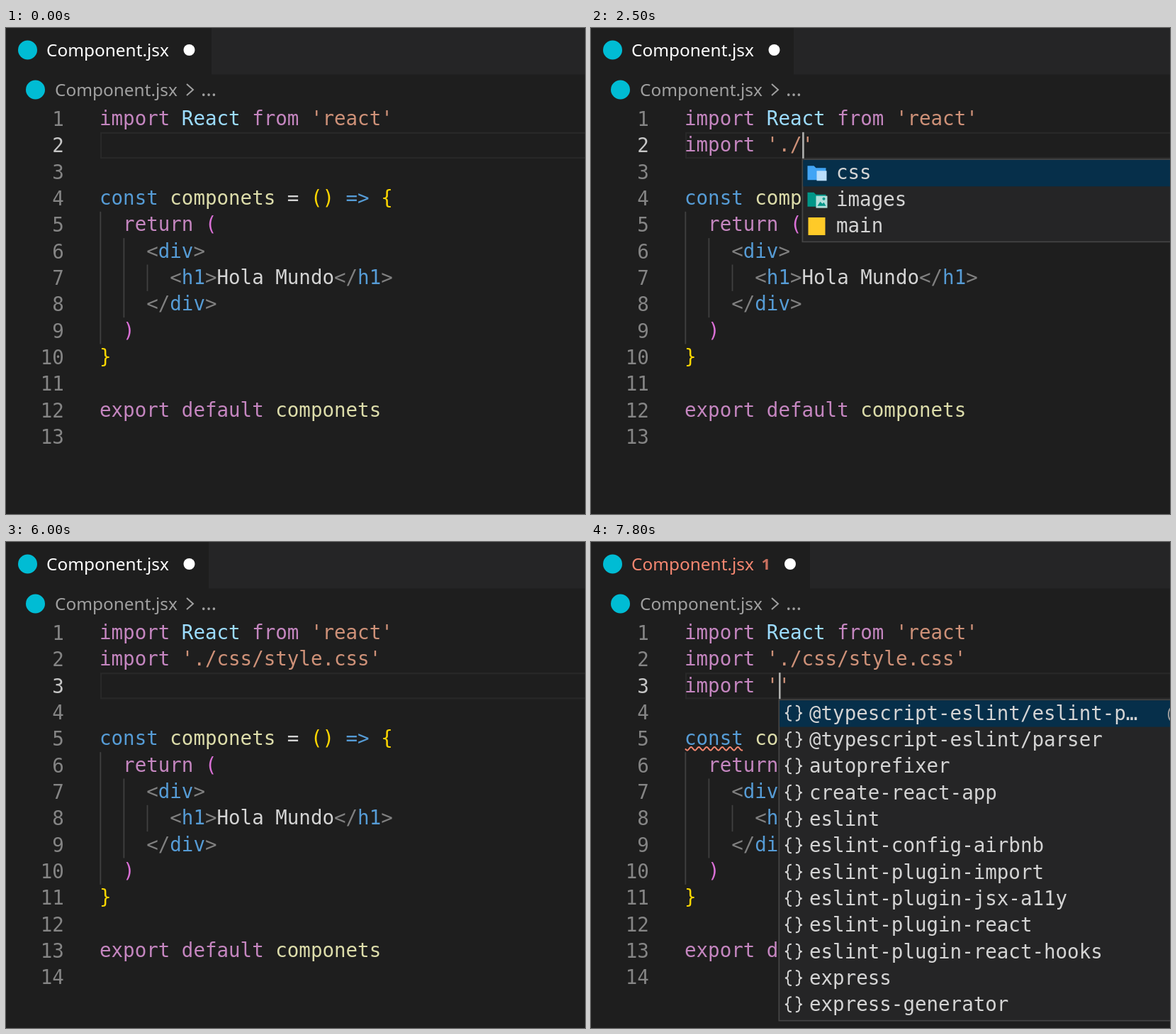
Recreate the animation shown at these times as an HTML page with a canvas. Size 817 by 685 pixels, loop 8 s.

```html
<!DOCTYPE html>
<html lang="es">
<head>
<meta charset="utf-8">
<title>Component.jsx</title>
<style>
html, body { margin: 0; width: 100%; height: 100%; overflow: hidden; background: #1e1e1e; }
canvas { display: block; }
</style>
</head>
<body>
<canvas id="stage" width="817" height="685"></canvas>
<script>
const ctx = document.getElementById('stage').getContext('2d');
const W = 817, H = 685, LOOP = 8000;
const LEFT = 132, ADV = 16.55, LINE = 37.33, TOP = 109.5;
const MONO = '27.5px "DejaVu Sans Mono", monospace';
const UI = '24.4px "Noto Sans", sans-serif';
const COLORS = {
  k: '#c586c0', v: '#9cdcfe', s: '#ce9178', b: '#569cd6', f: '#dcdcaa',
  d: '#d4d4d4', y: '#ffd700', p: '#da70d6', g: '#808080'
};

// Tokens: [class, text, class while the statement above is incomplete]
const tag = (open, name) => [['g', open, 'd'], ['b', name, 'v'], ['g', '>', 'd']];
const IMPORT_REACT = [['k', 'import '], ['v', 'React '], ['k', 'from '], ['s', "'react'"]];
const BODY = [
  [['b', 'const ', 'v'], ['f', 'componets '], ['d', '= '], ['y', '() '], ['b', '=> '], ['y', '{']],
  [['k', '  return ', 'v'], ['p', '(']],
  tag('    <', 'div'),
  [...tag('      <', 'h1'), ['d', 'Hola Mundo', 'v'], ...tag('</', 'h1')],
  tag('    </', 'div'),
  [['p', '  )']],
  [['y', '}']],
  [],
  [['k', 'export ', 'v'], ['k', 'default '], ['f', 'componets']]
];

// Suggestion lists: text offset, detail offset, rows of [icon, label, detail]
const WORDS = [
  ['keyword', 'import'], ['cube', 'importScripts'],
  ['snippet', 'import statement', 'Import external module'],
  ['variable', 'ImageBitmapRenderingContext']
];
const MENUS = {
  few: { text: 45.6, detail: 446, rows: WORDS },
  many: { text: 45.6, detail: 446, rows: [...WORDS,
    ['variable', 'Image'], ['variable', 'ImageBitmap'], ['variable', 'ImageData'],
    ['keyword', 'implements'], ['snippet', 'imp'], ['snippet', 'imd'],
    ['snippet', 'ime'], ['variable', 'HTMLImageElement']] },
  packages: { text: 43.6, detail: 549, rows: [
    '@typescript-eslint/eslint-p…', '@typescript-eslint/parser', 'autoprefixer',
    'create-react-app', 'eslint', 'eslint-config-airbnb', 'eslint-plugin-import',
    'eslint-plugin-jsx-a11y', 'eslint-plugin-react', 'eslint-plugin-react-hooks',
    'express', 'express-generator'
  ].map((name, i) => ['braces', name, i ? '' : '@typescript-eslint/eslint-plugin']) },
  files: { text: 48.5, rows: [['styles', 'css'], ['pictures', 'images'], ['script', 'main']] },
  sheet: { text: 48.8, rows: [['sheet', 'style.css']] }
};

// [start, typed text, menu, cursor hidden]
const STEPS = [
  [0, '', '', 1], [200, ''], [400, 'im'], [600, 'im', 'many'], [700, 'imp', 'few'],
  [800, 'impor', 'few'], [1000, 'import', 'few'], [1100, 'import '], [1600, 'import ', '', 1],
  [1800, "import '"], [1900, "import '", 'packages'], [2100, "import '."],
  [2400, "import './"], [2500, "import './", 'files'], [2900, "import './", 'files', 1],
  [3200, "import './css"], [3700, "import './css", '', 1], [3900, "import './css/"],
  [4000, "import './css/", 'sheet'], [4400, "import './css/style.css"],
  [4900, "import './css/style.css", '', 1], [5400, ''], [6000, '', '', 1], [6100, 'i'],
  [6200, 'im'], [6300, 'im', 'many'], [6400, 'imp', 'few'], [6500, 'impo', 'few'],
  [6600, 'impor', 'few'], [6800, 'import', 'few'], [6900, 'import ', 'few'],
  [7000, 'import '], [7400, 'import ', '', 1], [7700, "import '"],
  [7800, "import '", 'packages']
];
const NEW_LINE = 5400;

const within = (t, a, b) => t >= a && t < b;
const lineTop = n => TOP + (n - 1) * LINE;

function box(x, y, w, h, color) {
  ctx.fillStyle = color;
  ctx.fillRect(x, y, w, h);
}

function dot(x, y, r, color) {
  ctx.fillStyle = color;
  ctx.beginPath();
  ctx.arc(x, y, r, 0, Math.PI * 2);
  ctx.fill();
}

function poly(points, color, fill) {
  ctx.beginPath();
  points.forEach(([x, y]) => ctx.lineTo(x, y));
  if (fill) {
    ctx.fillStyle = color;
    ctx.fill();
  } else {
    ctx.strokeStyle = color;
    ctx.stroke();
  }
}

function label(text, x, y, color, font = UI) {
  ctx.font = font;
  ctx.fillStyle = color;
  ctx.fillText(text, x, y);
}

// Monospaced text on the character grid
function mono(text, x, y, color, bold) {
  [...text].forEach((ch, i) => {
    if (ch !== ' ') label(ch, x + i * ADV, y, color, (bold ? 'bold ' : '') + MONO);
  });
}

function codeLine(tokens, n, broken) {
  let col = 0;
  for (const [kind, text, alt] of tokens) {
    mono(text, LEFT + col * ADV, lineTop(n) + 27.4, COLORS[broken && alt || kind]);
    col += text.length;
  }
}

function importTokens(typed) {
  const word = typed.slice(0, 6);
  const rest = typed.slice(6);
  return [[word === 'import' ? 'k' : 'v', word],
    ['s', rest.includes("'") ? rest + "'" : rest]];
}

function folder(color) {
  poly([[0, -10], [9, -10], [12, -7], [26, -7], [26, 10], [0, 10]], color, true);
}

// Icons are drawn around the vertical centre of a row
const ICONS = {
  keyword() {
    ctx.strokeStyle = COLORS.d;
    ctx.strokeRect(1, -11, 13, 5);
    [[18, -9, 10], [0, -2, 15], [20, -2, 8], [0, 4, 23], [0, 9, 28]]
      .forEach(([x, y, w]) => box(x, y, w, 2, COLORS.d));
  },
  cube() {
    const c = '#b180d7';
    poly([[14, -13], [25, -7], [25, 6], [14, 12], [3, 6], [3, -7], [14, -13]], c);
    poly([[3, -7], [14, -1], [25, -7]], c);
    poly([[14, -1], [14, 12]], c);
  },
  snippet() {
    poly([[3, 9], [3, -12], [27, -12], [27, 9]], COLORS.d);
    for (let x = 2; x < 28; x += 4) box(x, 11, 2, 2, COLORS.d);
  },
  variable() {
    const c = '#75beff';
    poly([[6, -9], [1, -9], [1, 8], [6, 8]], c);
    poly([[23, -9], [28, -9], [28, 8], [23, 8]], c);
    poly([[8, -1], [16, -5], [21, -2], [21, 2], [13, 6], [8, 3], [8, -1], [13, 1], [21, -2]], c);
    poly([[13, 1], [13, 6]], c);
  },
  braces() {
    ctx.strokeStyle = COLORS.d;
    for (const side of [-1, 1]) {
      const x = d => 13.5 + side * d;
      ctx.beginPath();
      ctx.moveTo(x(3), -11);
      ctx.quadraticCurveTo(x(8), -11, x(8), -7);
      ctx.lineTo(x(8), -4);
      ctx.quadraticCurveTo(x(8), -.5, x(12), -.5);
      ctx.quadraticCurveTo(x(8), -.5, x(8), 3);
      ctx.lineTo(x(8), 6);
      ctx.quadraticCurveTo(x(8), 10, x(3), 10);
      ctx.stroke();
    }
  },
  styles() {
    folder('#42a5f5');
    box(13, -3, 14, 14, '#bbdefb');
  },
  pictures() {
    folder('#009688');
    box(12, -5, 16, 17, '#b2dfdb');
    poly([[14, 9], [18, 3], [21, 6], [23, 4], [26, 9]], '#009688', true);
    dot(23, -1, 2, '#009688');
  },
  script() { box(1, -12, 24, 25, '#ffca28'); },
  sheet() { box(1, -12, 25, 25, '#42a5f5'); }
};

// Indices of the label's letters that match the typed word, in order
function matches(text, query) {
  const find = q => {
    const hits = new Set();
    let from = 0;
    for (const ch of q) {
      const at = text.toLowerCase().indexOf(ch, from);
      if (at < 0) return null;
      hits.add(at);
      from = at + 1;
    }
    return hits;
  };
  return find(query) || find(query.replace('or', 'ro')) || new Set();
}

function drawMenu(menu, x, y, typed) {
  const height = menu.rows.length * LINE + 5;
  const query = typed.includes("'") ? '' : typed.trim();
  box(x, y, W, height + 1, '#454545');
  box(x + 1.8, y + 1.8, W, height - 2.4, '#252526');
  box(x + 1.8, y + 1.8, W, LINE, '#062f4a');
  menu.rows.forEach(([icon, text, detail], i) => {
    const mid = y + 1.5 + (i + .5) * LINE;
    ctx.save();
    ctx.translate(x + 8, mid);
    ctx.lineWidth = 2;
    ICONS[icon]();
    ctx.restore();
    const hits = matches(text, query);
    [...text].forEach((ch, c) => {
      const hit = hits.has(c);
      mono(ch, x + menu.text + c * ADV, mid + 9, hit ? '#0097fb' : COLORS.d, hit);
    });
    if (detail) mono(detail.slice(0, 24), x + menu.detail, mid + 9, '#9a9a9a');
  });
}

function drawHeader(error, t) {
  box(0, 0, W, 65.5, '#252526');
  box(0, 0, error ? 309 : t < 1600 ? 290 : 286, 66, '#1e1e1e');
  dot(30.5, 31, 13.5, '#00bcd4');
  label('Component.jsx', 57, 40, error ? '#f48771' : '#ffffff');
  if (error) label('1', 240.5, 39, '#c9705f', 'bold 22px "Noto Sans", sans-serif');
  dot(error ? 281 : 258.5, 31, 8, '#ffffff');

  dot(41.5, 87, 13.5, '#00bcd4');
  label('Component.jsx', 69, 96, '#a0a0a0');
  ctx.lineWidth = 2;
  poly([[255, 79], [264, 87], [255, 95]], '#a0a0a0');
  label('…', 275, 96, '#a0a0a0', '28px "Noto Sans", sans-serif');
}

function drawGuides(first) {
  [[0, 1, 5], [1, 2, 3], [2, 3, 1]].forEach(([level, skip, count]) =>
    box(LEFT + .4 + level * 2 * ADV, lineTop(first + skip), 1.8, count * LINE, '#404040'));
}

function squiggle(n) {
  const y = lineTop(n) + 32.5;
  ctx.lineWidth = 2;
  ctx.strokeStyle = '#f48771';
  ctx.beginPath();
  for (let x = 133; x <= 214; x++) ctx.lineTo(x, y + 2.3 * Math.sin((x - 133) * Math.PI * 2 / 11));
  ctx.stroke();
}

function draw(t) {
  const [, typed, menu, hidden] = STEPS.findLast(step => step[0] <= t);
  const row = t < NEW_LINE ? 2 : 3;
  const first = row + 2;
  const broken = typed.trim() === 'import';
  const flagged = within(t, 1500, 2200) || t >= 7300;
  const error = within(t, 1600, 2200) || t >= 7400;

  box(0, 0, W, H, '#1e1e1e');
  drawHeader(error, t);

  ctx.lineWidth = 2.2;
  ctx.strokeStyle = '#282828';
  ctx.strokeRect(134, lineTop(row) + 1.1, W, LINE - 2.2);
  drawGuides(first);

  for (let n = 1; n <= row + 11; n++) {
    const text = String(n);
    mono(text, 81.8 - text.length * ADV, lineTop(n) + 28.5, n === row ? '#c6c6c6' : '#858585');
  }

  codeLine(IMPORT_REACT, 1);
  if (row === 3) codeLine(importTokens("import './css/style.css"), 2);
  codeLine(importTokens(typed), row);
  BODY.forEach((tokens, i) => codeLine(tokens, first + i, broken));
  if (flagged) squiggle(first);

  const x = LEFT + typed.length * ADV;
  if (menu) {
    // The list stays beside the word when a space has just been typed
    drawMenu(MENUS[menu], LEFT + typed.trimEnd().length * ADV, lineTop(row + 1), typed);
  }
  if (!hidden) box(x + .6, lineTop(row), 2.6, LINE - .3, '#aeafad');
}

function tick(now) {
  draw(now % LOOP);
  requestAnimationFrame(tick);
}
requestAnimationFrame(tick);
</script>
</body>
</html>
```
